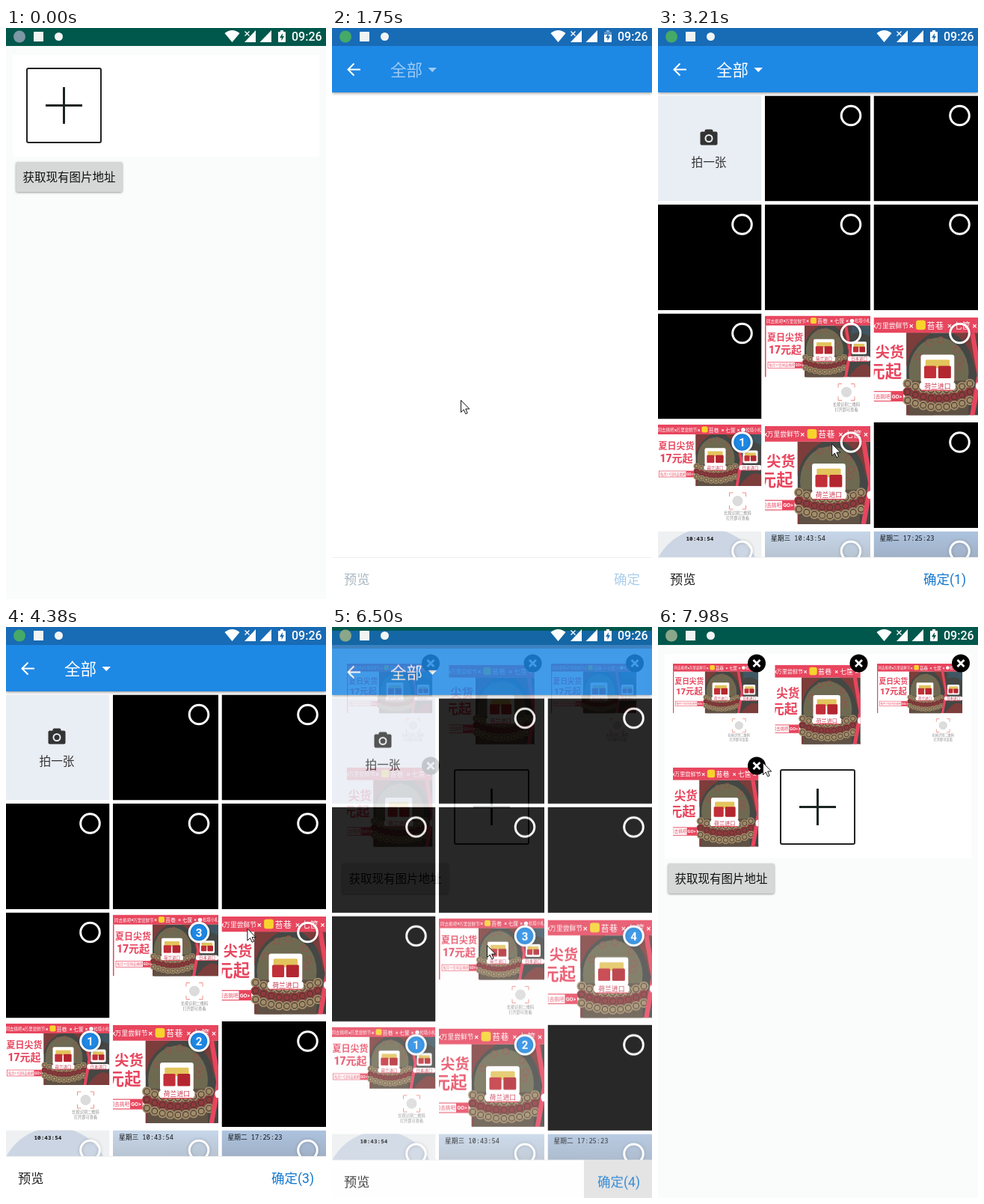
Write an HTML page with a canvas that moves like this. It is 428 px wide and 763 px high and loops after 8 s.

```html
<!DOCTYPE html>
<html lang="zh-CN">
<head>
<meta charset="utf-8">
<style>
  html, body { margin: 0; width: 100%; height: 100%; overflow: hidden; background: #fafbfb; }
  canvas { position: absolute; left: 0; top: 0; }
</style>
</head>
<body>
<canvas id="home" width="428" height="763"></canvas>
<canvas id="picker" width="428" height="763"></canvas>
<canvas id="overlay" width="428" height="763"></canvas>
<script>
const LOOP = 8000, STEP = 78;
const PINK = '#e8465e', BLUE = '#1e88e5';
const FONT = "Roboto, 'Noto Sans CJK SC', 'Noto Sans CJK', sans-serif";
const MONO = "'Noto Sans Mono', 'Noto Sans CJK SC', monospace";
const layer = id => document.getElementById(id).getContext('2d');
const home = layer('home'), picker = layer('picker'), overlay = layer('overlay');
let g = home;

function rect(x, y, w, h, color, radius = 0) {
  g.fillStyle = color;
  g.beginPath();
  g.roundRect(x, y, w, h, radius);
  g.fill();
}
function disc(x, y, r, color) {
  g.fillStyle = color;
  g.beginPath();
  g.arc(x, y, r, 0, 7);
  g.fill();
}
function ring(x, y, r, color, width) {
  g.strokeStyle = color;
  g.lineWidth = width;
  g.beginPath();
  g.arc(x, y, r, 0, 7);
  g.stroke();
}
function fillPath(d, color) {
  g.fillStyle = color;
  g.fill(new Path2D(d));
}
function strokePath(d, color, width) {
  g.strokeStyle = color;
  g.lineWidth = width;
  g.stroke(new Path2D(d));
}
// y is the visual middle of the line
function text(s, x, y, size, color, align = 'left', weight = 400, family = FONT) {
  g.font = `${weight} ${size}px ${family}`;
  g.fillStyle = color;
  g.textAlign = align;
  g.fillText(s, x, y + size * 0.37);
}
function at(x, y, scale, draw) {
  g.save();
  g.translate(x, y);
  g.scale(scale, scale);
  draw();
  g.restore();
}
function clip(x, y, w, h) {
  g.beginPath();
  g.rect(x, y, w, h);
  g.clip();
}

function product(x, y, w, label) {
  const h = w * 0.84;
  rect(x - w / 2, y - h / 2, w, h, '#fff', 2);
  rect(x - w * 0.36, y - h * 0.32, w * 0.72, h * 0.3, '#e3c45c', 1);
  rect(x - w * 0.4, y - h * 0.1, w * 0.36, h * 0.44, '#c22f38', 1);
  rect(x + w * 0.02, y - h * 0.1, w * 0.38, h * 0.44, '#b3262f', 1);
  rect(x - 15, y + 11, 30, 7, '#fff', 3);
  strokePath(`M${x - 13} ${y + 18}h26`, PINK, 0.8);
  text(label, x, y + 14.5, 5.5, '#c5324a', 'center', 500);
}

function cake(x, y) {
  g.save();
  g.translate(x, y);
  g.fillStyle = '#6e6a52';
  g.beginPath();
  g.ellipse(0, 2, 25, 29, 0, 0, 7);
  g.fill();
  rect(-25, 9, 50, 40, '#5f5144');
  for (let row = 0; row < 3; row++)
    for (let i = -4; i <= 4; i++) {
      const px = i * 6.5, py = 17 + row * 7 - i * i * 0.35;
      disc(px, py, 4, row === 1 ? '#8f3a3c' : '#a08d69');
      ring(px, py, 2.4, '#4d3531', 0.7);
    }
  for (let i = 0; i < 9; i++)
    ring(Math.cos(i * 2.4) * 18, Math.sin(i * 2.4) * 17 - 8, 2.5, '#93524a', 0.8);
  g.restore();
}

// Banner, 141 x 82 units
function banner() {
  g.save();
  clip(0, 0, 141, 82);
  rect(0, 0, 141, 82, '#fff');
  rect(53, 13, 88, 69, '#444744');
  fillPath('M53 13H74Q55 24 53 42ZM112 13H92Q109 24 110 46ZM53 82V64Q61 74 76 82Z', '#7c3d3b');
  cake(80, 44);
  fillPath('M106 13H110L116 48L110 82H106L112 48Z', PINK);
  fillPath('M112 82Q128 58 141 68V82Z', '#7c3d3b');
  fillPath('M116 13H141V28Q126 19 116 25Z', '#405762');
  rect(0, 0, 141, 13, PINK);
  rect(0, 13, 1.5, 69, PINK);
  const title = (s, x, size) => text(s, x, 7, size, '#fff', 'center', 500);
  title('同去挑吧', 13, 5.5);
  title('万里尝鲜节', 41, 5.5);
  title('苔巷', 77, 7);
  title('七筐', 99.5, 7);
  title('松塔小札', 130.5, 5.3);
  for (const x of [26, 57, 89, 110]) title('×', x, 7);
  rect(61, 2.5, 8, 8, '#f8d32c', 2);
  disc(116.5, 7, 2.8, '#fff');
  text('夏日尖货', 27, 29, 12, PINK, 'center', 900);
  text('17元起', 27, 45, 14, PINK, 'center', 900);
  g.strokeStyle = PINK;
  g.lineWidth = 0.7;
  g.strokeRect(4, 62, 46, 8);
  text('每月17日同去挑吧', 5.5, 66, 4.2, PINK);
  rect(40, 62, 10, 8, PINK);
  text('GO>', 45, 66, 4.5, '#fff', 'center', 700);
  product(79, 43, 28, '荷兰进口');
  product(126, 43, 20, '日本进口');
  g.restore();
}

function poster() {
  rect(0, 0, 141, 141, '#fff');
  at(0, 3, 1, banner);
  strokePath('M98 99V94H103M115 94H120V99M120 111V116H115M103 116H98V111', '#ee9084', 1);
  disc(109, 105, 7, '#e2e2e2');
  for (const r of [2, 4, 6]) ring(109, 105, r, '#cfcfcf', 0.7);
  text('长按识别二维码', 109, 121.5, 5.2, '#888', 'center');
  text('打开即可查看', 109, 128.5, 5.2, '#888', 'center');
}

function closeUp() {
  rect(0, 0, 141, 141, '#fff');
  g.save();
  clip(0, 5, 141, 131);
  at(-41, 5, 1.6, banner);
  g.restore();
}

function plusBox(x, y) {
  g.strokeStyle = '#222';
  g.lineWidth = 2;
  g.beginPath();
  g.roundRect(x + 1, y + 1, 99, 99, 2);
  g.stroke();
  strokePath(`M${x + 26} ${y + 50.5}h49M${x + 50.5} ${y + 26}v49`, '#1c2422', 3);
}

function drawHome(filled) {
  g = home;
  const shift = filled ? 137 : 0;
  rect(0, 0, 428, 763, '#fafbfb');
  rect(0, 0, 428, 24, '#00574b');
  rect(9, 36, 410, 136 + shift, '#fff');
  if (filled) {
    for (let i = 0; i < 4; i++) {
      const x = 20 + i % 3 * 136.5, y = 46.5 + (i > 2) * 137;
      at(x, y, 0.81, i % 2 ? closeUp : poster);
      disc(x + 112, y + 2, 12, '#000');
      strokePath(`M${x + 107.5} ${y - 2.5}l9 9m0 -9l-9 9`, '#fff', 2.8);
    }
    plusBox(163, 190);
  } else plusBox(27, 53);
  g.save();
  g.shadowColor = '#0006';
  g.shadowBlur = 3;
  g.shadowOffsetY = 1;
  rect(13.5, 179 + shift, 142, 40, '#d6d7d7', 2);
  g.restore();
  text('获取现有图片地址', 84.5, 199.5 + shift, 15.5, '#111', 'center');
}

const blank = () => rect(0, 0, 141, 141, '#000');
function camera() {
  rect(0, 0, 141, 141, '#e9edf4');
  rect(59, 48, 23, 18, '#333', 2);
  rect(65, 45, 11, 5, '#333', 2);
  ring(70.5, 57, 4.5, '#e9edf4', 2);
  text('拍一张', 70.5, 89, 15.7, '#333', 'center');
}
function sky(top, bottom, stamp) {
  const fade = g.createLinearGradient(0, 0, 0, 36);
  fade.addColorStop(0, top);
  fade.addColorStop(1, bottom);
  rect(0, 0, 141, 141, fade);
  text(stamp, 8, 9.5, 8.7, '#111', 'left', 500, MONO);
}
function dome() {
  rect(0, 0, 141, 141, '#eef0f1');
  disc(68, 70, 74, '#ccd5e3');
  text('10:43:54', 40, 9.5, 7.7, '#111', 'left', 600, MONO);
}
const cells = [camera, blank, blank, blank, blank, blank, blank, poster, closeUp, poster, closeUp, blank, dome,
  () => sky('#c6d6e9', '#b7c3d1', '星期三 10:43:54'),
  () => sky('#adc3df', '#9fb0c6', '星期二 17:25:23')];
const pickOrder = [9, 10, 7, 8], pickTimes = [2835, 3435, 4075, 4780];

function drawPicker(t) {
  g = picker;
  const loaded = t >= 1970, count = pickTimes.filter(p => t >= p).length;
  rect(0, 0, 428, 763, '#fff');
  if (loaded) cells.forEach((draw, i) => {
    const x = -2.5 + i % 3 * 145.5, y = 90.5 + Math.floor(i / 3) * 145.5;
    g.save();
    g.translate(x, y);
    clip(0, 0, 141, 141);
    draw();
    g.restore();
    if (!i) return;
    const n = pickOrder.indexOf(i) + 1, picked = n && n <= count;
    g.save();
    g.shadowColor = '#0003';
    g.shadowBlur = 4;
    if (picked) disc(x + 115, y + 26.5, 13, BLUE);
    ring(x + 115, y + 26.5, 12.8, '#fff', 3);
    g.restore();
    if (picked) text(n, x + 115, y + 26.5, 15, '#fff', 'center', 700);
  });
  g.save();
  g.shadowColor = '#0007';
  g.shadowBlur = 4;
  g.shadowOffsetY = 1;
  rect(0, 24, 428, 62, BLUE);
  g.restore();
  rect(0, 0, 428, 24, '#186bb5');
  strokePath('M38 55.5H22M29.5 47.5L21.5 55.5L29.5 63.5', '#fff', 2);
  const titleColor = loaded ? '#fff' : '#ffffff90';
  text('全部', 78, 56, 21.5, titleColor);
  fillPath('M128.5 53H140L134.2 59Z', titleColor);
  rect(0, 707, 428, 56, '#fff');
  rect(0, 707, 428, 1, '#eee');
  if (t >= 6180) rect(337, 707, 91, 56, '#e0e0e0');
  text('预览', 16, 737, 17.2, count ? '#222' : '#a9b7c1');
  text('确定' + (count ? `(${count})` : ''), 412, 737, 17.5, count ? '#1277d0' : '#a9cdec', 'right');
}

function pickerPose(t) {
  if (t < 1260 || t >= 6880) return [0, 0];
  if (t < 6400) {
    const p = Math.min(1, (t - 1240) / 350);
    return [61 * (1 - p) ** 5, Math.min(1, p * 1.75)];
  }
  const held = t < 6640 ? Math.min(t, 6500) : Math.min(t, 6730);
  const p = Math.max(0, (held - 6403) / 333);
  return [61 * p * p, Math.min(1, 1 - (p - 0.14) / 0.87)];
}

// time, x, y of the pointer tip
const pointer = [[100, 190, 763], [720, 62, 110], [1120, 62, 110], [1738, 172, 497], [1900, 172, 497],
  [2650, 108, 556], [2850, 108, 556], [3210, 245, 555], [3500, 250, 552], [3900, 250, 406],
  [4100, 250, 406], [4380, 335, 402], [4700, 395, 405], [4860, 395, 405], [5490, 373, 733],
  [5716, 375, 728], [6190, 375, 728], [6490, 207, 425], [6880, 207, 425], [7040, 203, 390],
  [7900, 140, 181], [8000, 140, 181]];

function drawOverlay(t) {
  g = overlay;
  g.clearRect(0, 0, 428, 763);
  disc(18, 11.5, 8, t < 1260 ? '#7c97a6' : t < 6400 ? '#45a968' : '#8aa789');
  rect(37, 5, 13, 13, '#f2f4f4');
  disc(70.5, 11.5, 5.5, '#f2f4f4');
  fillPath('M302.5 19L292.5 7Q302.5 -1 312.5 7Z', '#fff');
  fillPath('M319 19H334V3L327 10.5ZM339.5 19H355V3Z', '#fff');
  strokePath('M319.5 4.5l6 6m0 -6l-6 6', '#fff', 1.3);
  const charging = (t + 680) % 1100 < 450;
  rect(367, 3, 4, 2, charging ? '#fff8' : '#fff');
  rect(364, 5, 10, 14, '#fff', 1);
  if (charging) rect(364, 5, 10, 4, '#5d97cc');
  fillPath('M370 7L366 13H368.5V17L372 11H369.7Z', t < 1260 || t > 6640 ? '#00574b' : '#186bb5');
  text('09:26', 382, 11.5, 16, '#fff', 'left', 500);

  const next = pointer.findIndex(k => k[0] > t);
  if (next < 1) return;
  const [t0, x0, y0] = pointer[next - 1], [t1, x1, y1] = pointer[next];
  const p = (t - t0) / (t1 - t0), e = p * p * (3 - 2 * p);
  at(x0 + (x1 - x0) * e, y0 + (y1 - y0) * e, 1, () => {
    const arrow = 'M0.5 0.5V16.5L4.2 13L6.8 18.7L9.2 17.6L6.7 12H11.7Z';
    fillPath(arrow, '#fff');
    strokePath(arrow, '#111', 1);
  });
}

let shown = -1;
function frame(now) {
  const raw = now % LOOP;
  const t = raw < 100 ? 0 : 100 + Math.floor((raw - 100) / STEP) * STEP;
  if (t !== shown) {
    shown = t;
    drawHome(t > 5000);
    drawPicker(t);
    drawOverlay(t);
    const [y, alpha] = pickerPose(t);
    picker.canvas.style.transform = `translateY(${y}px)`;
    picker.canvas.style.opacity = alpha;
  }
  requestAnimationFrame(frame);
}
requestAnimationFrame(frame);
</script>
</body>
</html>
```
